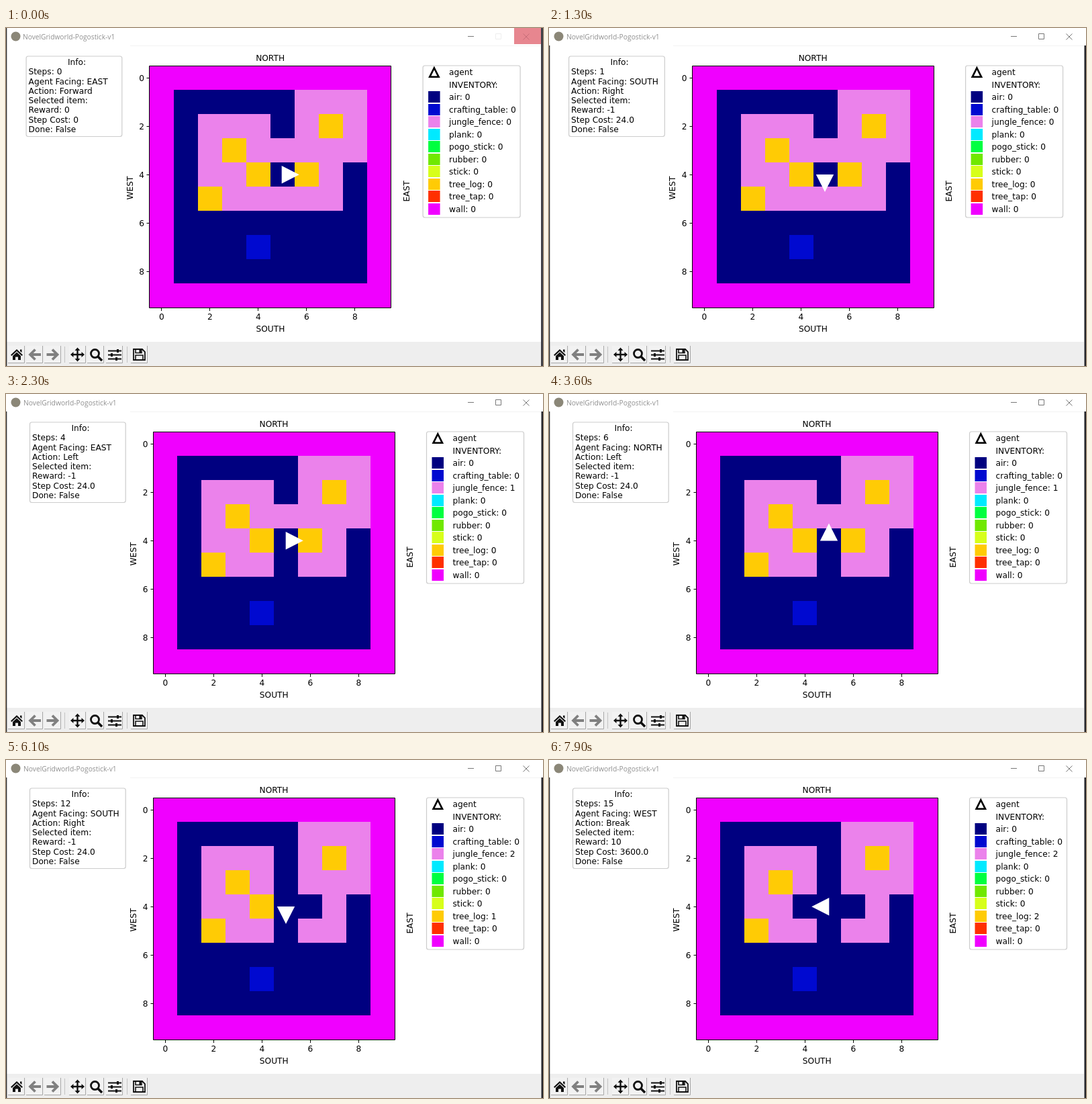
Write an HTML page with a canvas that moves like this. It is 800x503 px and loops after 8 s.

```html
<!DOCTYPE html>
<html>
<head>
<meta charset="utf-8">
<style>
  html, body { margin: 0; overflow: hidden; background: #fff; }
  canvas { display: block; }
</style>
</head>
<body>
<canvas id="stage" width="800" height="503"></canvas>
<script>
const ctx = document.getElementById('stage').getContext('2d');
const LOOP = 8000, CELL = 36, LEFT = 219, TOP = 56;

const ITEMS = [
  ['air', '#000080'], ['crafting_table', '#0009d0'], ['jungle_fence', '#eb82eb'],
  ['plank', '#00eaff'], ['pogo_stick', '#00ff40'], ['rubber', '#70e800'],
  ['stick', '#d7ff1a'], ['tree_log', '#ffcb05'], ['tree_tap', '#ff3000'], ['wall', '#f000ff']
];
// Each digit indexes ITEMS.
const MAP = [
  '9999999999', '9000002229', '9022202729', '9027222229', '9022707209',
  '9072222209', '9000000000', '9000100000', '9000000000', '9999999999'
].map(row => row.slice(0, 9) + '9');

const FACINGS = ['NORTH', 'EAST', 'SOUTH', 'WEST'];
const AHEAD = [[5, 3], [6, 4], [5, 5], [4, 4]];
const COST = { Left: '24.0', Right: '24.0', Forward: '27.906975', Break: '3600.0' };
const ACTIONS = [
  [900, 'Right'], [1500, 'Forward'], [1900, 'Break'], [2300, 'Left'], [2800, 'Forward'],
  [3200, 'Left'], [3700, 'Forward'], [4200, 'Break'], [4700, 'Right'], [5000, 'Forward'],
  [5300, 'Break'], [5900, 'Right'], [6300, 'Right'], [6700, 'Forward'], [7100, 'Break']
];
const SHIFTS = [-5.4, -5.9, -3];   // the layout settles during the first steps

function stateAt(time) {
  const s = { step: 0, facing: 1, action: 'Forward', reward: 0, cost: 0,
              map: MAP.map(row => [...row].map(Number)), owned: ITEMS.map(() => 0) };
  for (const [start, action] of ACTIONS) {
    if (time < start) break;
    s.step++;
    s.action = action;
    s.cost = COST[action];
    s.reward = -1;
    if (action === 'Right') s.facing = (s.facing + 1) % 4;
    if (action === 'Left') s.facing = (s.facing + 3) % 4;
    if (action === 'Break') {
      const [x, y] = AHEAD[s.facing], item = s.map[y][x];
      s.owned[item]++;
      s.map[y][x] = 0;
      if (item === 7) s.reward = 10;
    }
  }
  return s;
}

function rect(x, y, w, h, color) {
  ctx.fillStyle = color;
  ctx.fillRect(x, y, w, h);
}

function text(str, x, midY, align = 'left') {
  ctx.font = '12.2px "DejaVu Sans", sans-serif';
  ctx.fillStyle = '#000';
  ctx.textAlign = align;
  ctx.fillText(str, x, midY + 4);
}

function sideText(str, x, y) {
  ctx.save();
  ctx.translate(x, y);
  ctx.rotate(-Math.PI / 2);
  text(str, 0, 0, 'center');
  ctx.restore();
}

function shape(path, { fill, stroke, width = 1 }) {
  const p = new Path2D(path);
  if (fill) { ctx.fillStyle = fill; ctx.fill(p); }
  if (stroke) { ctx.strokeStyle = stroke; ctx.lineWidth = width; ctx.stroke(p); }
}

function roundBox(x, y, w, h) {
  ctx.beginPath();
  ctx.roundRect(x, y, w, h, 3);
  ctx.strokeStyle = '#ccc';
  ctx.lineWidth = 1.2;
  ctx.stroke();
}

function drawTitleBar(hover) {
  rect(185, 26, 612, 1, '#f3f3f3');
  ctx.beginPath();
  ctx.arc(14.5, 12.5, 7, 0, 7);
  ctx.fillStyle = '#8b8778';
  ctx.fill();
  ctx.font = `${hover ? 10.2 : 10.3}px "Open Sans", sans-serif`;
  ctx.fillStyle = '#909090';
  ctx.textAlign = 'left';
  ctx.fillText('NovelGridworld-Pogostick-v1', hover ? 25 : 26, 16.5);
  if (hover) rect(757, 0, 40, 24, '#e7868f');
  shape('M688 12.5H697', { stroke: '#777' });
  shape('M729.5 8.5H737.5V16.5H729.5Z', { stroke: hover ? '#eee' : '#777' });
  shape('M770.5 8.5L779.5 17.5M779.5 8.5L770.5 17.5', { stroke: hover ? '#c66d78' : '#777' });
}

function drawToolbar() {
  rect(0, 467, 797, 36, '#eeeeee');
  for (const x of [3, 30, 57, 94, 121, 149, 186]) {
    rect(x, 473, 25, 26, '#f2f2f2');
    shape(`M${x} 498.5H${x + 24.5}V473`, { stroke: '#a8a8a8' });
  }
  for (const x of [87.5, 180.5]) shape(`M${x} 474V498`, { stroke: '#c4c4c4' });
  const black = '#111', gray = '#808080';
  shape('M16 478L25 486.5L23.5 488L16 481L8.5 488L7 486.5ZM21 478.5H23.5V483L21 481ZM10 488L16 482.5L22 488V494H18V489.5H14V494H10Z', { fill: black });
  const arrow = 'M43.5 478.5L36 486L43.5 493.5M37 486H52';
  shape(arrow, { stroke: gray, width: 3.8 });
  ctx.save();
  ctx.translate(112.5, 0);
  ctx.scale(-1, 1);
  shape(arrow, { stroke: gray, width: 3.8 });
  ctx.restore();
  shape('M106.5 479V493M99 486H114', { stroke: black, width: 2.4 });
  shape('M106.5 475.5L110.5 480H102.5ZM106.5 496.5L110.5 492H102.5ZM96 486L100.5 482V490ZM117 486L112.5 482V490Z', { fill: black });
  ctx.beginPath();
  ctx.arc(132.5, 484.5, 6, 0, 7);
  ctx.strokeStyle = black;
  ctx.lineWidth = 2.8;
  ctx.stroke();
  shape('M137 489L143 495', { stroke: black, width: 3.5 });
  shape('M152 480.5H172M152 486.5H172M152 492.5H172', { stroke: black, width: 1.8 });
  shape('M165 478H168V483H165ZM156 484H159V489H156ZM163 490H166V495H163Z', { fill: black });
  shape('M190 478H203L207 482V494H190Z', { stroke: black, width: 1.8 });
  shape('M193 478H202V483.5H193ZM193 487H204V494H193Z', { stroke: black, width: 1.6 });
  rect(198.5, 479, 2.5, 4, black);
}

function drawInfo(s, shift) {
  ctx.save();
  ctx.translate(shift, 0);
  roundBox(35.5, 42, 142.7, 119.5);
  text('Info:', 111, 51, 'center');
  [`Steps: ${s.step}`, `Agent Facing: ${FACINGS[s.facing]}`, `Action: ${s.action}`, 'Selected item:',
   `Reward: ${s.reward}`, `Step Cost: ${s.cost}`, 'Done: False'
  ].forEach((line, i) => text(line, 39, 65.2 + i * 14.3));
  ctx.restore();
}

// Cells and frame sit on whole pixels, so that neighbours meet without seams.
function drawPlot(s, shift) {
  const size = CELL * 10, left = LEFT + shift;
  const cellLeft = Math.ceil(left), frameLeft = Math.floor(left) + .5;
  s.map.forEach((row, y) => row.forEach((item, x) => {
    const color = ITEMS[x === 9 ? 9 : item][1];
    rect(cellLeft + x * CELL, TOP + y * CELL, CELL, CELL, color);
  }));
  ctx.save();
  ctx.translate(frameLeft - .5 + 5.5 * CELL, 218.3);
  ctx.rotate(s.facing * Math.PI / 2);
  shape('M0 -25.8L13.2 0.3H-13.2Z', { fill: '#fff' });
  ctx.restore();

  shape(`M${frameLeft} ${TOP + .5}h${size}v${size}h-${size}Z`, { stroke: '#000' });
  for (let n = 0; n < 10; n += 2) {
    const offset = (n + .5) * CELL;
    shape(`M${frameLeft - 4} ${TOP + offset + .5}h4M${frameLeft + offset} ${TOP + size + 1}v4`, { stroke: '#000' });
    text(n, left - 7.5, TOP + offset + 1, 'right');
    text(n, left + offset + .3, 430, 'center');
  }
  text('NORTH', left + 180, 45, 'center');
  text('SOUTH', left + 180.3, 448, 'center');
  sideText('WEST', left - 28.7, 238);
  sideText('EAST', left + 383.3, 243);
}

function drawLegend(s, shift) {
  ctx.save();
  ctx.translate(shift, 0);
  roundBox(626.5, 56, 145, 226);
  shape('M643.3 59.5L650 72.8H636.6Z', { stroke: '#000', width: 2.6 });
  text('agent', 665.5, 66);
  text('INVENTORY:', 665.5, 84.5);
  ITEMS.forEach(([name, color], i) => {
    const y = 103 + i * 18.55;
    rect(634.5, Math.round(y) - 9, 17.5, 17, color);
    text(`${name}: ${s.owned[i]}`, 665.5, y);
  });
  ctx.restore();
}

function draw(now) {
  const time = now % LOOP, hover = time < 100;
  const s = stateAt(time), shift = SHIFTS[s.step] ?? 0;
  rect(0, 0, 800, 503, '#fff');
  drawTitleBar(hover);
  drawInfo(s, shift);
  drawPlot(s, shift);
  drawLegend(s, shift);
  drawToolbar();
  const edgeTop = hover ? 0 : 26, edge = hover ? '#404046' : '#25252a';
  rect(0, edgeTop, 1.3, 503, '#2b2b2b');
  rect(hover ? 797 : 797.5, edgeTop, 3, 503, edge);
  requestAnimationFrame(draw);
}
requestAnimationFrame(draw);
</script>
</body>
</html>
```
